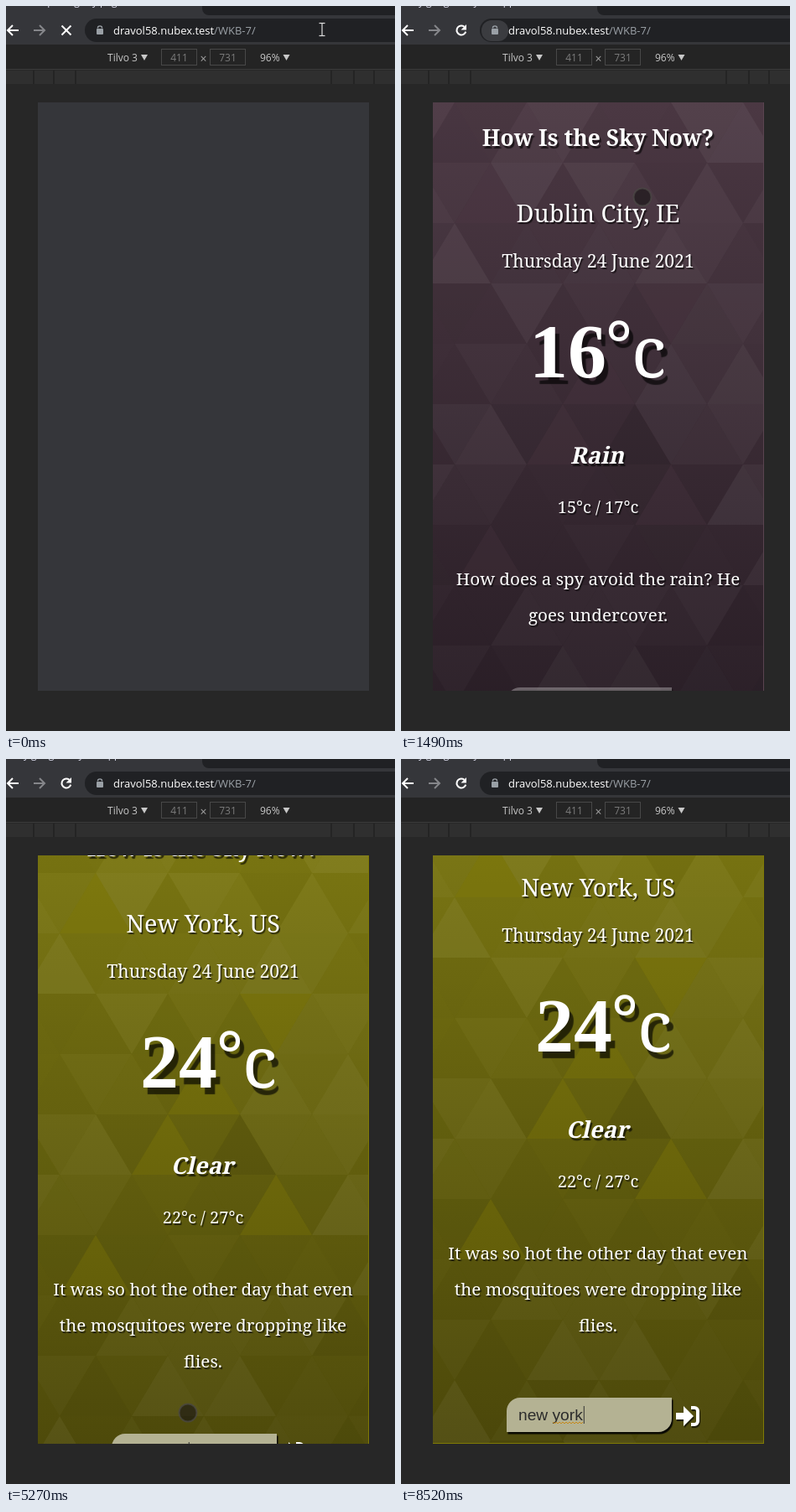
An HTML page with a canvas for the animation above (9020 ms loop, 464 px wide and 865 px high).

```html
<!DOCTYPE html>
<html lang="en">
<head>
<meta charset="utf-8">
<title>Weather demo</title>
<style>
  html, body { margin: 0; width: 100%; height: 100%; overflow: hidden; background: #272727; }
  canvas { display: block; }
</style>
</head>
<body>
<canvas id="stage" width="464" height="865"></canvas>
<script>
const ctx = document.getElementById('stage').getContext('2d');
const LOOP = 9020;
const SERIF = '"Noto Serif", serif';
const SANS = '"Open Sans", sans-serif';
const ARIAL = '"Liberation Sans", Arial, sans-serif';
const PAGE = { x: 38, y: 115, w: 395, h: 702 };
const MID = 235;

const HOST = 'dravol58.nubex.test';
const TITLE = 'How Is the Sky Now?';

const BLUE = {
  top: '#0673a3', bottom: '#04465f', glow: 'rgba(0,125,185,.22)', edge: '#0f77ab', field: '#a4c0cb',
  message: ['Without geolocation', 'permission please search for', 'your location below'],
  inputY: 762
};
const RAIN = {
  top: '#4b3843', bottom: '#291e26', glow: 'rgba(88,64,78,.15)', edge: '#5a4450', field: '#aca6a9',
  city: 'Dublin City, IE', temp: '16', tempX: 245, sky: 'Rain', range: '15°c / 17°c',
  joke: ['How does a spy avoid the rain? He', 'goes undercover.'],
  inputY: 813
};
const CLEAR = {
  top: '#7d7912', bottom: '#4c480a', glow: 'rgba(135,130,0,.22)', edge: '#7f7a05', field: '#b4b293',
  city: 'New York, US', temp: '24', tempX: 252, sky: 'Clear', range: '22°c / 27°c',
  joke: ['It was so hot the other day that even', 'the mosquitoes were dropping like', 'flies.'],
  inputY: 856
};

// Keys are [step, value, ...]
const POINTER = [[1, 377, 28], [3, 293, 141], [4, 293, 141], [6, 288, 228], [8, 400, 470],
  [10, 404, 419], [12, 217, 780], [21, 217, 780], [24, 406, 516], [27, 406, 567],
  [29, 406, 567], [31, 406, 473], [32, 441, 450]];
const SCROLL = [[8, 0], [10, 51], [24, 51], [27, 0], [29, 0], [31, 94]];
const TYPED = ['n', 'ne', 'new', 'new yo', 'new york'];

function keyed(keys, n) {
  const i = keys.findIndex(k => k[0] >= n);
  if (i < 0) return keys[keys.length - 1].slice(1);
  if (i === 0) return keys[0].slice(1);
  const a = keys[i - 1], b = keys[i], p = (n - a[0]) / (b[0] - a[0]);
  return a.slice(1).map((v, j) => v + (b[j + 1] - v) * p);
}

function text(s, x, y, font, color = '#fff', align = 'left') {
  ctx.font = font;
  ctx.fillStyle = color;
  ctx.textAlign = align;
  ctx.fillText(s, x, y);
}

function rect(x, y, w, h, color) {
  ctx.fillStyle = color;
  ctx.fillRect(x, y, w, h);
}

function line(points, color, width) {
  ctx.beginPath();
  points.forEach(p => ctx.lineTo(...p));
  ctx.strokeStyle = color;
  ctx.lineWidth = width;
  ctx.stroke();
}

function shape(points, color) {
  ctx.beginPath();
  points.forEach(p => ctx.lineTo(...p));
  ctx.fillStyle = color;
  ctx.fill();
}

function pill(x, y, w, h, r, color) {
  ctx.beginPath();
  ctx.roundRect(x, y, w, h, r);
  ctx.fillStyle = color;
  ctx.fill();
}

function shadow(dx, dy, alpha = .65) {
  ctx.shadowColor = `rgba(0,0,0,${alpha})`;
  ctx.shadowOffsetX = dx;
  ctx.shadowOffsetY = dy;
  ctx.shadowBlur = dx ? 1 : 0;
}
const noShadow = () => shadow(0, 0, 0);

function slanted(s, y, size) {
  ctx.save();
  ctx.translate(MID - 1, y);
  ctx.transform(1, 0, -.22, 1, 0, 0);
  text(s, 0, 0, `bold ${size}px ${SERIF}`, '#fff', 'center');
  ctx.restore();
}

function chrome(n) {
  rect(0, 0, 464, 865, '#272727');
  rect(0, 0, 464, 47, '#35363a');
  pill(234, -20, 260, 31, 8, '#202124');
  if (n) text('Sky gauge for your app', 8, -1, '12px ' + SANS, '#dde');
  else text('Opening sky page', 40, -1, '12px ' + SANS, '#dde');

  for (const [x, d, color] of [[8, -1, '#fff'], [40, 1, '#85868a']]) {
    line([[x - 7 * d, 29], [x + 6 * d, 29]], color, 2);
    line([[x, 23], [x + 6 * d, 29], [x, 35]], color, 2);
  }
  if (n) {
    ctx.beginPath();
    ctx.arc(72, 29, 5.5, .3, 5.4);
    ctx.strokeStyle = '#fff';
    ctx.lineWidth = 2;
    ctx.stroke();
    shape([[78, 22], [78, 28.5], [71.5, 28.5]], '#fff');
  } else {
    line([[66.5, 23.5], [77.5, 34.5]], '#fff', 2);
    line([[77.5, 23.5], [66.5, 34.5]], '#fff', 2);
  }

  pill(94, 15, 400, 28, 14, '#202124');
  if (n > 0 && n < 7) pill(96, 17, 32, 25, 12, '#3b3c40');
  pill(108, 27, 8, 7, 1, '#9aa0a6');
  ctx.beginPath();
  ctx.arc(112, 26.5, 2.6, Math.PI, 0);
  ctx.strokeStyle = '#9aa0a6';
  ctx.lineWidth = 1.4;
  ctx.stroke();
  const font = '13px ' + SANS;
  text(HOST, 128, 34, font);
  text('/WKB-7/', 128 + ctx.measureText(HOST).width, 34, font, '#9aa0a6');

  rect(0, 46, 464, 30, '#242424');
  rect(0, 75, 464, 1, '#3b3b3b');
  const small = '12px ' + SANS;
  text('Tilvo 3', 121, 66, small, '#c8c8c8');
  text('96%', 303, 66, small, '#c8c8c8');
  for (const x of [165, 334.5]) shape([[x - 4, 58], [x + 4, 58], [x, 65]], '#c8c8c8');
  for (const [x, s] of [[185, '411'], [243, '731']]) {
    ctx.strokeStyle = '#484848';
    ctx.lineWidth = 1;
    ctx.strokeRect(x + .5, 51.5, 42, 19);
    text(s, x + 21.5, 66, small, '#7c7c7c', 'center');
  }
  text('×', 235.5, 68, '14px ' + SANS, '#a0a0a0', 'center');
  rect(0, 77, 464, 16, '#2f2f2f');
  for (const x of [32, 56, 82, 387, 414, 438]) rect(x, 77, 2, 16, '#242424');
}

function triangles(theme, height) {
  const fill = ctx.createLinearGradient(0, PAGE.y, 0, PAGE.y + height);
  fill.addColorStop(0, theme.top);
  fill.addColorStop(1, theme.bottom);
  rect(PAGE.x, PAGE.y, PAGE.w, height, fill);
  const glow = ['1,1', '4,4', '5,3', '6,6', '7,1', '3,6'];
  const light = ['1,2', '0,8', '6,8', '4,8', '2,0', '2,6'];
  for (let r = 0; r < 12; r++) for (let c = -1; c < 10; c++) {
    const key = r + ',' + c, x = 21 + 43 * c, y = PAGE.y + 72 * r;
    const up = (r + c) % 2 === 0;
    const seed = Math.sin(r * 12.9 + c * 78.2) * 43758;
    const tone = seed - Math.floor(seed) - .45;
    let color = `rgba(${tone > 0 ? '255,255,255' : '0,0,0'},${Math.abs(tone) * .08})`;
    if (glow.includes(key)) color = theme.glow;
    if (light.includes(key)) color = 'rgba(255,255,255,.05)';
    if (key === '5,5') color = 'rgba(0,0,0,.1)';
    const base = up ? y + 72 : y, tip = up ? y : y + 72;
    shape([[x, base], [x + 86, base], [x + 43, tip]], color);
  }
}

function searchBar(theme, n) {
  const y = theme.inputY;
  ctx.globalAlpha = n === 1 || n === 6 || n === 19 ? .5 : 1;
  shadow(1.5, 2.5, .9);
  pill(126, y, 197, 41, [16, 0, 16, 0], theme.field);
  noShadow();
  const font = '19.2px ' + ARIAL, base = y + 27;
  const typed = n < 14 ? '' : TYPED[Math.min(n - 14, 4)];
  if (typed) text(typed, 140, base, font, '#2b2b2b');
  else text('eg Dublin, IE', 140, base, font, '#757575');
  ctx.font = font;
  const end = 141 + ctx.measureText(typed).width;
  if (n >= 12 && n % 11) rect(end, y + 10, 1, 21, '#333');
  if (n >= 18) {
    const wave = [];
    for (let x = 181, i = 0; x <= end; x += 2, i++) wave.push([x, y + 29 + i % 2 * 2]);
    line(wave, '#c88a18', 1);
  }
  ctx.globalAlpha = 1;
  if (n === 1) return;
  shadow(1, 2);
  shape([[328, y + 18], [337, y + 18], [337, y + 10], [349, y + 22], [337, y + 34], [337, y + 26], [328, y + 26]], '#fff');
  ctx.beginPath();
  ctx.moveTo(346, y + 12);
  ctx.arcTo(354, y + 12, 354, y + 32, 4);
  ctx.arcTo(354, y + 32, 346, y + 32, 4);
  ctx.lineTo(346, y + 32);
  ctx.strokeStyle = '#fff';
  ctx.lineWidth = 4;
  ctx.stroke();
  noShadow();
}

function report(theme) {
  const centre = (s, y, size) => text(s, MID, y, `500 ${size}px ${SERIF}`, '#fff', 'center');
  shadow(1.5, 2);
  centre(theme.city, 258, 28.8);
  centre('Thursday 24 June 2021', 312, 21.2);
  centre(theme.range, 605, 20);
  theme.joke.forEach((s, i) => centre(s, 691 + 43 * i, 20.7));
  shadow(2, 3);
  slanted(theme.sky, 546, 27.5);
  shadow(5, 8);
  const x = theme.tempX;
  text(theme.temp, x, 443, 'bold 92px "Liberation Serif", serif', '#fff', 'right');
  text('°', x - 1, 434, '500 80px ' + SERIF);
  text('c', x + 30, 443, '500 84px ' + SERIF);
  noShadow();
}

function page(n) {
  if (!n) return rect(PAGE.x, PAGE.y, PAGE.w, PAGE.h, '#35363a');
  const theme = n < 6 ? BLUE : n < 19 ? RAIN : CLEAR;
  const [scroll] = keyed(SCROLL, n);
  const height = theme.inputY - 60;
  ctx.save();
  ctx.beginPath();
  ctx.rect(PAGE.x, PAGE.y, PAGE.w, PAGE.h);
  ctx.clip();
  ctx.save();
  ctx.translate(0, -scroll);
  triangles(theme, height);
  shadow(2, 3);
  text(TITLE, MID, 167, 'bold 26.4px ' + SERIF, '#fff', 'center');
  if (theme.message) theme.message.forEach((s, i) => slanted(s, 270 + 57.5 * i, 26));
  noShadow();
  if (theme.city) report(theme);
  searchBar(theme, n);
  ctx.restore();
  rect(432, 115, 1, 702, theme.edge);
  if (scroll >= height - PAGE.h - 1) rect(38, 816, 395, 1, theme.edge);
  if ((n > 8 && n < 12) || (n > 23 && n < 34)) {
    const k = 687 / height;
    pill(426, 119 + scroll * k, 3, PAGE.h * k, 1, 'rgba(128,120,110,.7)');
  }
  ctx.restore();
}

function prompt(n) {
  if (n < 1 || n > 4) return;
  ctx.globalAlpha = n === 1 ? .45 : 1;
  shadow(1, 2, .4);
  pill(100, 48, 310, 124, 4, '#292a2d');
  noShadow();
  text(HOST + ' wants to', 115, 79, '13.5px ' + SANS, '#e8eaed');
  text('Know your location', 144, 105, '11px ' + SANS, '#e8eaed');
  ctx.beginPath();
  ctx.arc(124, 98, 4.5, Math.PI * .9, Math.PI * .1);
  ctx.lineTo(124, 107);
  ctx.fillStyle = '#bdc1c6';
  ctx.fill();
  line([[390, 57], [398, 65]], '#bdc1c6', 1.5);
  line([[398, 57], [390, 65]], '#bdc1c6', 1.5);
  for (const [x, s] of [[262, 'Allow'], [332, 'Block']]) {
    ctx.beginPath();
    ctx.roundRect(x + .5, 127.5, 61, 28, 4);
    ctx.strokeStyle = '#4a4b50';
    ctx.lineWidth = 1;
    ctx.stroke();
    text(s, x + 31, 145, '600 11px ' + SANS, '#6ab4f8', 'center');
  }
  ctx.globalAlpha = 1;
}

function pointer(n) {
  if (n > 32) return;
  const [x, y] = keyed(POINTER, n);
  if (n < 2) {
    line([[x, y - 7], [x, y + 7]], '#ddd', 1.2);
    for (const d of [-7.5, 7.5]) line([[x - 3.5, y + d], [x + 3.5, y + d]], '#ddd', 1.2);
  } else if (n < 5 || n === 32) {
    const arrow = [[0, 0], [0, 15], [3.5, 12], [6, 17.5], [8, 16.5], [5.7, 11], [10, 11], [0, 0]]
      .map(([a, b]) => [x + a, y + b]);
    shape(arrow, '#fff');
    line(arrow, '#111', 1);
  } else {
    const pressed = (n > 8 && n < 11) || (n > 23 && n < 32);
    const tint = n < 19 ? ['rgba(140,125,135,.65)', 'rgba(165,150,160,.6)']
                        : ['rgba(172,163,28,.8)', 'rgba(178,170,30,.8)'];
    ctx.beginPath();
    ctx.arc(x, y, 10.5, 0, 7);
    ctx.fillStyle = pressed ? tint[0] : 'rgba(22,18,20,.6)';
    ctx.fill();
    ctx.strokeStyle = pressed ? tint[1] : 'rgba(75,72,70,.7)';
    ctx.lineWidth = 2;
    ctx.stroke();
  }
}

let shown = -1;
function tick(now) {
  const n = Math.min(34, Math.floor((now % LOOP + 16) / 250.8));
  if (n !== shown) {
    shown = n;
    chrome(n);
    page(n);
    prompt(n);
    pointer(n);
  }
  requestAnimationFrame(tick);
}
tick(performance.now());
</script>
</body>
</html>
```
